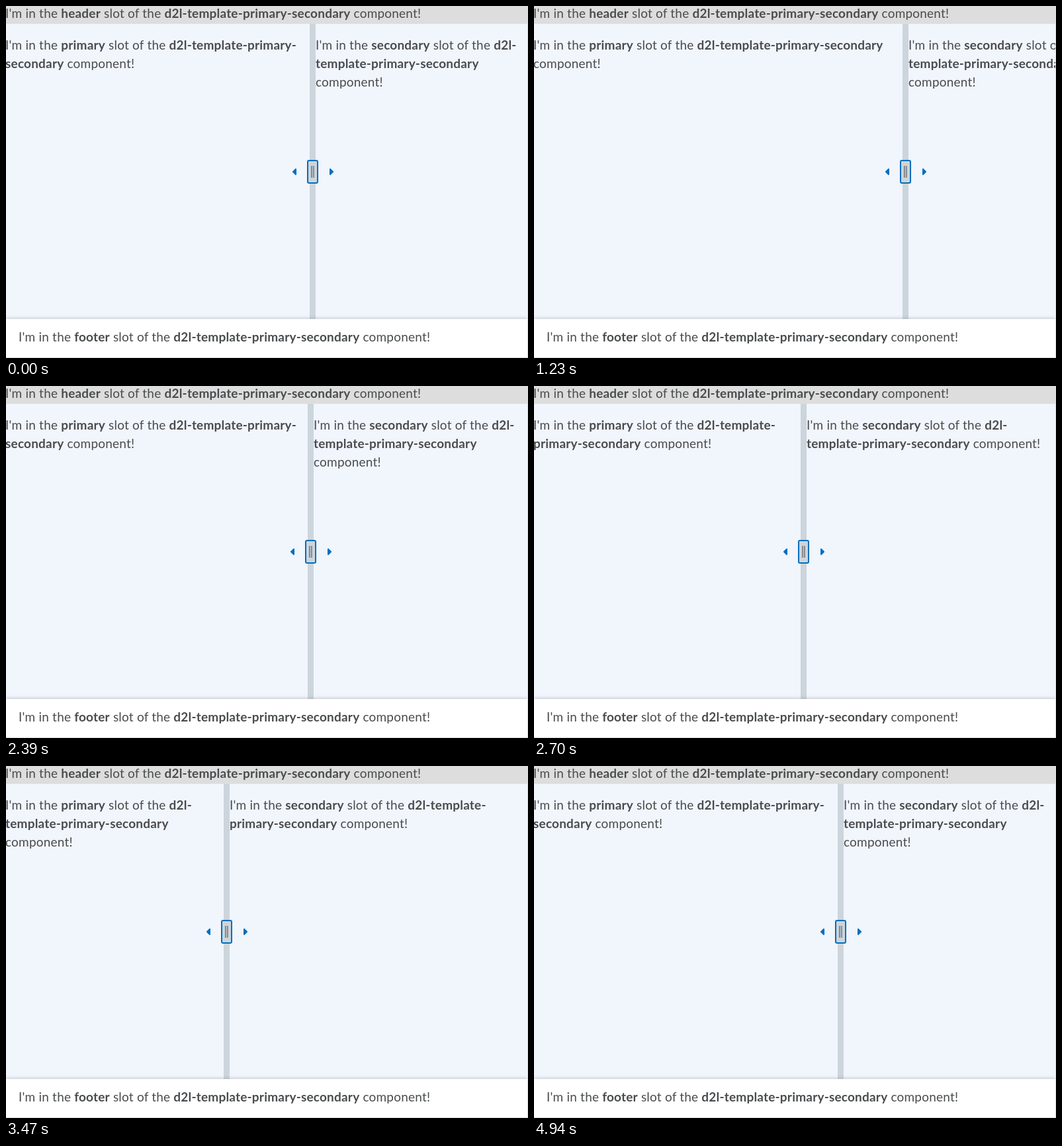
An HTML page that plays this animation: 789x533 px, repeating every 5240 ms.

```html
<!DOCTYPE html>
<html lang="en">
<head>
<meta charset="utf-8">
<title>Resizable panels</title>
<style>
html, body { margin: 0; width: 100%; height: 100%; overflow: hidden; }
body { position: relative; background: #f1f5fc; color: #494c4e;
  font: 19px/28px Lato, sans-serif; letter-spacing: .2px; }
div, p, svg { position: absolute; margin: 0; }
b { font-weight: 700; }
#header { left: 0; top: 0; width: 789px; height: 27px; background: #ddd; }
#header p { left: -1px; top: -3px; white-space: nowrap; }
#content { left: 0; top: 27px; width: 788px; height: 447px; overflow: hidden; }
#content p { top: 18px; }
#primary { left: -1px; }
#divider { top: 0; width: 9px; height: 447px; background: #cdd5dc; }
#handle { left: -30px; top: 204px; }
#footer { left: 0; top: 474px; width: 788px; height: 58px; background: #fff;
  box-shadow: 0 -2px 4px rgba(73, 76, 78, .2); }
#footer p { left: 19px; top: 13px; white-space: nowrap; }
#edge { left: 0; top: 0; width: 788px; height: 532px; border: solid #ddd; border-width: 0 1px 1px 0; }
</style>
</head>
<body>
<div id="content">
  <p id="primary">I'm in the <b>primary</b> slot of the <b>d2l-template-primary-secondary</b> component!</p>
  <p id="secondary">I'm in the <b>secondary</b> slot of the <b>d2l-template-primary-secondary</b> component!</p>
  <div id="divider">
    <svg id="handle" width="70" height="40">
      <rect x="27" y="3" width="15" height="34" rx="2" fill="#cdd5dc" stroke="#006fbf" stroke-width="2"/>
      <path d="M33 11v18M36 11v18" stroke="#86898c" stroke-width="2" transform="translate(-.1)"/>
      <path d="M5 20l4-4v8zM65 20l-4-4v8z" fill="#006fbf" stroke="#006fbf" stroke-width="2" stroke-linejoin="round"/>
    </svg>
  </div>
</div>
<div id="footer"><p>I'm in the <b>footer</b> slot of the <b>d2l-template-primary-secondary</b> component!</p></div>
<div id="header"><p>I'm in the <b>header</b> slot of the <b>d2l-template-primary-secondary</b> component!</p></div>
<div id="edge"></div>
<script>
const LOOP = 5240, TICK = 76.7, REST = 459;
// Divider positions, one per tick from each start time
const moves = [
  { start: 225, xs: [571, 681, 731, 761, 775, 779] },   // collapse
  { start: 1145, xs: [667, 557, 507, 477, 463, REST] }, // expand
  { start: 2385, xs: [456, 447, 434, 420, 403, 389, 384, 379, 374, 366, 358, 350, 341, 332, 329, 327] },
  { start: 4165, xs: [334, 352, 368, 380, 395, 409, 422, 434, 445, 454, REST] }
];
const style = id => document.getElementById(id).style;
const primary = style('primary'), secondary = style('secondary'), divider = style('divider');

function position(t) {
  const move = moves.filter(m => t >= m.start).pop();
  if (!move) return REST;
  const step = Math.floor((t - move.start) / TICK);
  return move.xs[Math.min(step, move.xs.length - 1)];
}

function draw(now) {
  const x = position(now % LOOP);
  primary.width = x + 1 + 'px';
  divider.left = x + 'px';
  secondary.left = x + 9 + 'px';
  secondary.width = Math.max(320, 779 - x) + 'px';
  requestAnimationFrame(draw);
}
draw(0);
</script>
</body>
</html>
```
